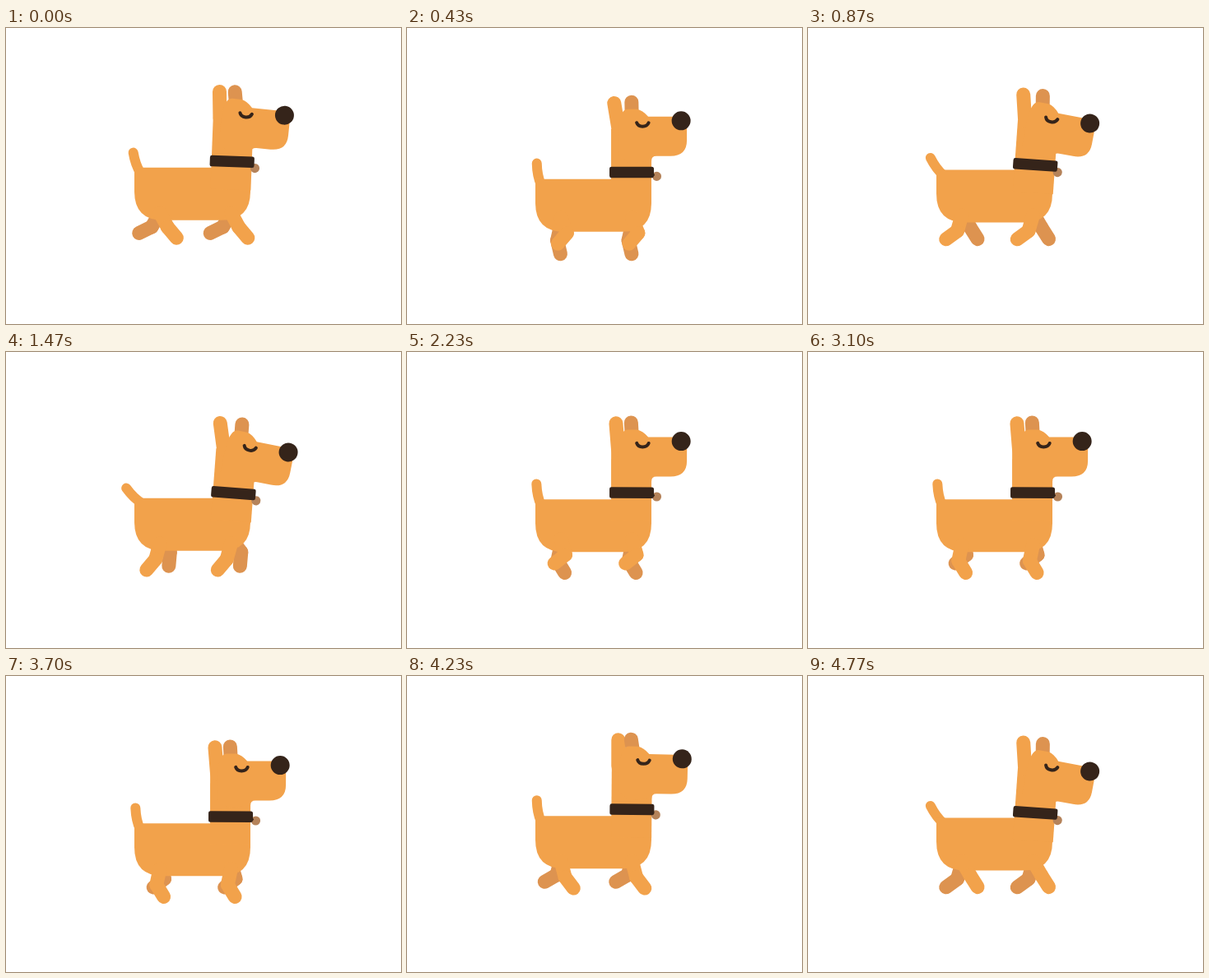
An HTML page without scripts that plays this animation: 480x360 px, repeating every 4.81 s.

```html
<!DOCTYPE html>
<html lang="en">
<head>
<meta charset="utf-8">
<title>Walking dog</title>
<style>
  @property --a { syntax: "<angle>"; inherits: true; initial-value: 0deg; }
  @property --p { syntax: "<angle>"; inherits: true; initial-value: 0deg; }
  @property --nod { syntax: "<number>"; inherits: true; initial-value: 0; }

  html, body { margin: 0; width: 100%; height: 100%; overflow: hidden; background: #fff; }
  svg { display: block; width: 480px; height: 360px; }

  /* --a is the stride angle: 20deg per drawing, with one held and one dropped drawing */
  .walk { animation: stride 4.81s -6ms infinite; }
  @keyframes stride {
    0%      { --a: 0deg;    animation-timing-function: steps(39, jump-none); }
    27.027% { --a: 760deg;  animation-timing-function: steps(40); }
    54.747% { --a: 1560deg; animation-timing-function: steps(1); }
    55.44%  { --a: 1600deg; animation-timing-function: steps(64); }
    99.79%, 100% { --a: 2880deg; }
  }

  .coat { fill: #f2a24b; }
  .ink { fill: #35241a; }
  .limb { fill: none; stroke: #f2a24b; stroke-width: 17; stroke-linecap: round; }
  .far .limb, .limb.far { stroke: #dd9350; }
  .line { fill: none; stroke: #35241a; stroke-width: 4; stroke-linecap: round; }

  .dog {
    --b: calc(2 * var(--a));
    --x: calc(var(--b) - 296deg);
    --nod: calc(.5 + .5 * cos(var(--x)) + .15 * (cos(2 * var(--x)) - .9));
    transform: translateY(calc(-1.8px - 7.8px * cos(var(--b) - 14deg)));
  }
  .neck { transform-origin: 246px 217px; transform: rotate(calc(4.4deg * var(--nod))); }
  .head { transform-origin: 267px 135px; transform: rotate(calc(7.2deg * var(--nod))); }
  .ear { transform-origin: 256px 112px; transform: rotate(calc(7deg * cos(var(--b) - 52deg) - 1.5deg)); }
  .far-ear { transform-origin: 273px 100px; transform: rotate(calc(-4deg - 5deg * cos(var(--b)))); }
  .bell { transform-origin: 297px 171px; transform: rotate(calc(14deg + 14deg * cos(var(--b) - 320deg))); }
  .tail {
    --w: calc(var(--b) - 280deg);
    stroke-width: 12;
    transform-origin: 163px 182px;
    transform: rotate(calc(-33deg * (.5 + .5 * cos(var(--w)) + .2 * (cos(2 * var(--w)) - .85))));
  }

  /* --p is the stride angle wrapped to one turn; 0 = leg reaching forward */
  .near { --p: atan2(sin(var(--a)), cos(var(--a))); }
  .far { --p: atan2(sin(var(--a) + 180deg), cos(var(--a) + 180deg)); }
  .leg {
    transform-origin: 187px 234px;
    transform: translateY(calc(8px * min(0, sin(var(--p))))) rotate(calc(30deg
      - .767 * clamp(0deg, var(--p) + 180deg, 60deg)
      - .275 * clamp(0deg, var(--p) + 120deg, 80deg)
      + .4 * clamp(0deg, var(--p) + 40deg, 20deg)
      + .1 * clamp(0deg, var(--p) + 20deg, 20deg)
      + .667 * clamp(0deg, var(--p), 60deg)
      + .04 * clamp(0deg, var(--p) - 60deg, 100deg)
      + .7 * clamp(0deg, var(--p) - 160deg, 20deg)));
  }
  .shin {
    transform-origin: 187px 254px;
    transform: rotate(calc(34deg
      + .567 * clamp(0deg, var(--p) + 180deg, 60deg)
      - .3125 * clamp(0deg, var(--p) + 120deg, 80deg)
      - 2.25 * clamp(0deg, var(--p) + 40deg, 20deg)
      - .5 * clamp(0deg, var(--p) + 20deg, 20deg)
      - .517 * clamp(0deg, var(--p), 60deg)
      + .85 * clamp(0deg, var(--p) - 60deg, 80deg)
      + .65 * clamp(0deg, var(--p) - 140deg, 20deg)
      - .2 * clamp(0deg, var(--p) - 160deg, 20deg)));
  }
</style>
</head>
<body>
<svg class="walk" viewBox="0 0 480 360">
  <g class="dog">
    <g class="far">
      <g class="leg"><path class="limb" d="M187 234v20"/><path class="limb shin" d="M187 254v17"/></g>
      <g transform="translate(86.5)">
        <g class="leg"><path class="limb" d="M187 234v20"/><path class="limb shin" d="M187 254v17"/></g>
      </g>
    </g>

    <path class="limb tail" d="M163 186Q158 175 157.5 160"/>
    <path class="coat" d="M156 179H297V208Q297 243 262 243H191Q156 243 156 208Z"/>

    <g class="near">
      <g class="leg"><path class="limb" d="M187 234v20"/><path class="limb shin" d="M187 254v17"/></g>
      <g transform="translate(86.5)">
        <g class="leg"><path class="limb" d="M187 234v20"/><path class="limb shin" d="M187 254v17"/></g>
      </g>
    </g>

    <g class="neck">
      <path class="coat" d="M248 118H297V205H248Z"/>
      <path class="limb ear" d="M253.3 86.5L256.5 118"/>
      <g class="head">
        <path class="limb far far-ear" d="M272.5 85.5L273 100"/>
        <path class="coat" d="M257 125Q257 94 268 94H279Q286 95 293 103H325Q340 103 340 118V132Q340 151 320 151H303Q297 151 297 157L270 160 257 150Z"/>
        <path class="line" d="M279 110.5C281 116.5 291 116.5 293.5 110.5"/>
        <circle class="ink" cx="333" cy="108" r="11.5"/>
      </g>
      <g class="bell">
        <circle cx="303.5" cy="175.5" r="5.6" fill="#b5835a"/>
        <path class="line" style="stroke-width:2" d="M297 171l3 3"/>
      </g>
      <rect class="ink" x="246" y="164" width="54" height="13.5" rx="2.5"/>
    </g>
  </g>
</svg>
</body>
</html>
```
